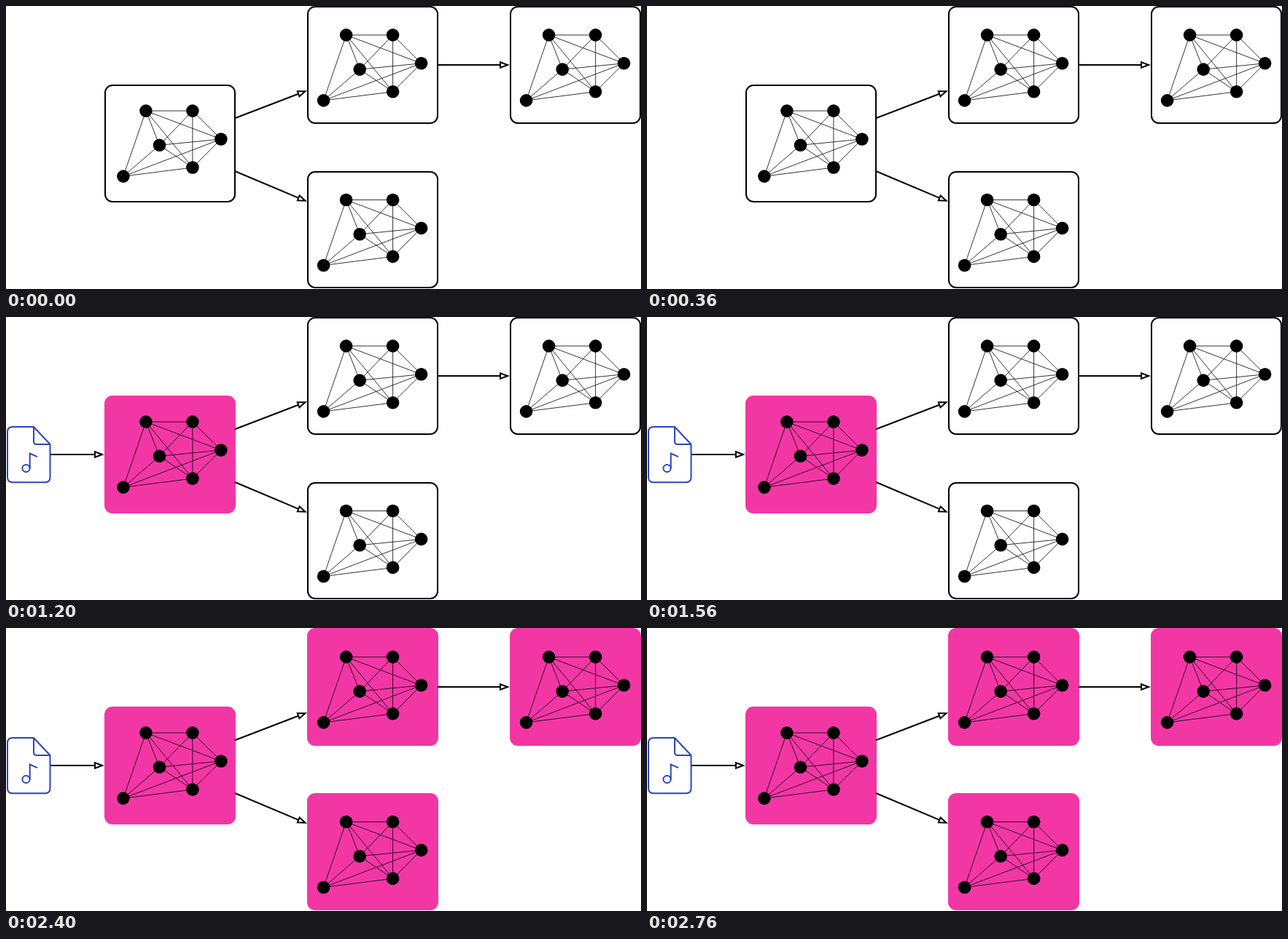
Animation, 871 px wide and 389 px high, one loop 3 s. Source, as an HTML page:

```html
<!DOCTYPE html>
<html lang="en">
<head>
<meta charset="utf-8">
<title>Network chain</title>
<style>
  html, body { margin: 0; width: 100%; height: 100%; overflow: hidden; background: #fff; }
  svg { display: block; width: 871px; height: 389px; }
</style>
</head>
<body>
<svg id="stage" viewBox="0 0 871 389" xmlns="http://www.w3.org/2000/svg">
  <g id="boxes"></g>
  <g id="arrows"></g>
  <g id="input" fill="none" stroke="#2b45ba" stroke-width="2">
    <path d="M38 151H9Q2 151 2 158V220Q2 227.200 9 227.200H53.500Q60.500 227.200 60.500 220V175ZV171Q38 175 42 175H60.500" stroke-linejoin="round"/>
    <circle cx="27.500" cy="208" r="5.100"/>
    <path d="M32.700 208V187.500L43 192.200"/>
  </g>
</svg>
<script>
const NS = 'http://www.w3.org/2000/svg';
const STEP = 600, LOOP = 3000, PINK = '#f237a5';
const $ = id => document.getElementById(id);

function add(parent, tag, attrs) {
  const el = document.createElementNS(NS, tag);
  for (const key in attrs) el.setAttribute(key, attrs[key]);
  return parent.appendChild(el);
}

const nodes = [[0, 0], [64, 0], [103, 38.9], [18.6, 47.2], [64, 77.9], [-31, 90]];
const edges = ['01', '02', '03', '04', '05', '12', '13', '14', '23', '24', '25', '34', '35', '45'];

function network(x, y) {
  const g = add($('boxes'), 'g', { transform: `translate(${x} ${y})` });
  for (const [a, b] of edges) {
    const [x1, y1] = nodes[a], [x2, y2] = nodes[b];
    add(g, 'line', { x1, y1, x2, y2, stroke: '#000', 'stroke-width': 0.8 });
  }
  for (const [cx, cy] of nodes) add(g, 'circle', { cx, cy, r: 8.8 });
}

function arrow(parent, x1, y1, x2, y2) {
  const len = Math.hypot(x2 - x1, y2 - y1);
  const deg = Math.atan2(y2 - y1, x2 - x1) * 180 / Math.PI;
  return add(parent, 'path', {
    d: `M0 0H${len - 12}M${len - 12} -3.700L${len - 2} 0L${len - 12} 3.700Z`,
    transform: `translate(${x1} ${y1}) rotate(${deg})`,
    fill: '#fff', stroke: '#000', 'stroke-width': 2
  });
}

// box corner and height, first node, step at which it lights up
const boxes = [
  [136, 109, 160, 191.9, 144.1, 2],
  [414, 1, 160, 466.6, 39.9, 3],
  [414, 228, 159, 466.6, 266.5, 3],
  [692, 1, 160, 744.6, 39.9, 4]
].map(([x, y, height, nx, ny, at]) => {
  const el = add($('boxes'), 'rect', { x, y, width: 178, height, rx: 10, 'stroke-width': 2 });
  network(nx, ny);
  return { el, at };
});

arrow($('arrows'), 314, 154.2, 412.3, 116.5);
arrow($('arrows'), 314, 227, 412.3, 268.5);
arrow($('arrows'), 592, 81, 690, 81);
const inArrow = arrow($('arrows'), 60, 189, 134, 189);

function draw(time) {
  const step = Math.floor(time % LOOP / STEP);
  const shown = step >= 1 ? 'visible' : 'hidden';
  $('input').setAttribute('visibility', shown);
  inArrow.setAttribute('visibility', shown);
  for (const { el, at } of boxes) {
    const lit = step >= at;
    el.setAttribute('fill', lit ? PINK : '#fff');
    el.setAttribute('stroke', lit ? PINK : '#000');
  }
}

function tick() {
  draw(performance.now());
  requestAnimationFrame(tick);
}
tick();
</script>
</body>
</html>
```
